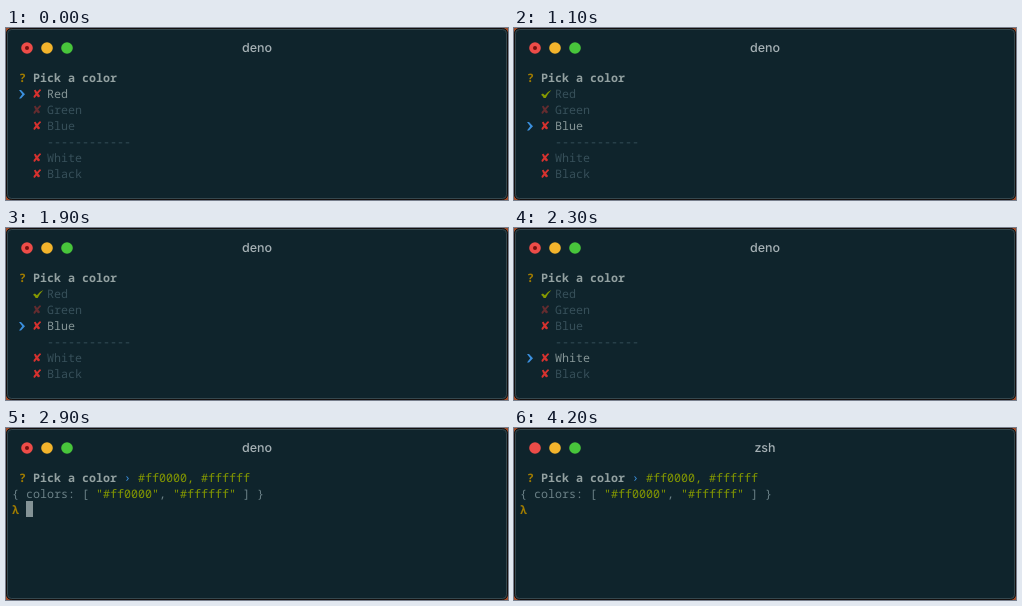
Animation of 502 by 172 pixels, one loop 4500 ms. Source, as an HTML page:

```html
<!DOCTYPE html>
<html lang="en">
<head>
<meta charset="utf-8">
<title>Terminal checkbox prompt</title>
<style>
  html, body { margin: 0; width: 100%; height: 100%; overflow: hidden; background: #a04c2a; }
  svg { display: block; }
  text { font: 11.667px "Noto Sans Mono", "DejaVu Sans Mono", monospace; white-space: pre; text-rendering: geometricPrecision; }
  .bold { font-weight: 700; }
  .cross { font: 12px "DejaVu Sans", sans-serif; }
  #title { font: 500 12.5px Inter, Roboto, sans-serif; text-anchor: middle; }
</style>
</head>
<body>
<svg width="502" height="172" viewBox="0 0 502 172">
  <rect x=".5" y=".5" width="501" height="171" rx="5" fill="#0f242c" stroke="#14100f"/>
  <rect x="1.5" y="1.5" width="499" height="169" rx="4" fill="none" stroke="#34474e"/>
  <circle cx="21" cy="20" r="5.8" fill="#ed4c48"/>
  <circle id="busy" cx="21" cy="20" r="2" fill="#74110f"/>
  <circle cx="41" cy="20" r="5.8" fill="#f3b42c"/>
  <circle cx="61" cy="20" r="5.8" fill="#48c53b"/>
  <text id="title" x="251" y="24" fill="#a5b0b4"></text>
  <g id="screen"></g>
</svg>
<script>
const LOOP = 4500;
const COLOR = {
  gold: '#a07c00', bright: '#93a1a1', active: '#869697', text: '#6b8187', dim: '#37505a',
  red: '#d7322f', faintRed: '#632c2f', green: '#859900', blue: '#3b8fdd'
};
const options = ['Red', 'Green', 'Blue', null, 'White', 'Black'];
const $ = id => document.getElementById(id);

// Terminal cells are 7 by 16 pixels; the first one starts at (6, 41).
const cellX = col => 6 + 7 * col;
const baseline = row => 54 + 16 * row;

const put = (col, row, string, color, kind = '') =>
  `<text class="${kind}" x="${cellX(col)}" y="${baseline(row)}" fill="${color}">${string}</text>`;

const shape = (x, row, path, color) =>
  `<path transform="translate(${x} ${baseline(row) - 8})" d="${path}" fill="${color}"/>`;

const cross = (row, color) =>
  `<text class="cross" x="26" y="${baseline(row)}" fill="${color}">✘</text>`;

const check = row =>
  shape(27, row, 'M0 4.8L1.9 3.4L3.9 5.3Q6.4 1.6 10.4 0Q7 3.4 4.7 8H2.7Q1.6 5.9 0 4.8Z', COLOR.green);

const pointer = row =>
  shape(13, row, 'M0 0H2L6 4.2L2 8.4H0L3.2 4.2Z', COLOR.blue);

const question = () =>
  put(1, 0, '?', COLOR.gold, 'bold') + put(3, 0, 'Pick a color', COLOR.bright, 'bold');

function menu(t) {
  const active = t < 1100 ? 0 : t < 2100 ? 2 : 4;
  const checked = {
    Red: t >= 700,
    Blue: t >= 1400 && t < 1900,
    White: t >= 2600
  };
  return question() + pointer(active + 1) + options.map((name, i) => {
    const row = i + 1;
    if (!name) return put(5, row, '-'.repeat(12), COLOR.dim);
    const icon = checked[name] ? check(row) : cross(row, name === 'Green' ? COLOR.faintRed : COLOR.red);
    return icon + put(5, row, name, i === active ? COLOR.active : COLOR.dim);
  }).join('');
}

function answer(t) {
  const cursor = t < 4200 ? '<rect x="20" y="73" width="7" height="16" fill="#849396"/>' : '';
  return question() +
    put(16, 0, '›', COLOR.blue) +
    put(18, 0, '#ff0000, #ffffff', COLOR.green) +
    put(0, 1, '{ colors: [', COLOR.text) +
    put(12, 1, '"#ff0000"', COLOR.green) +
    put(21, 1, ',', COLOR.text) +
    put(23, 1, '"#ffffff"', COLOR.green) +
    put(33, 1, '] }', COLOR.text) +
    put(0, 2, 'λ', COLOR.gold, 'bold') + cursor;
}

let shown = '';
function draw() {
  const t = performance.now() % LOOP;
  const running = t < 3600;
  const content = t < 2900 ? menu(t) : answer(t);
  $('title').textContent = running ? 'deno' : 'zsh';
  $('busy').style.display = running ? '' : 'none';
  if (content !== shown) $('screen').innerHTML = shown = content;
  requestAnimationFrame(draw);
}
draw();
</script>
</body>
</html>
```
